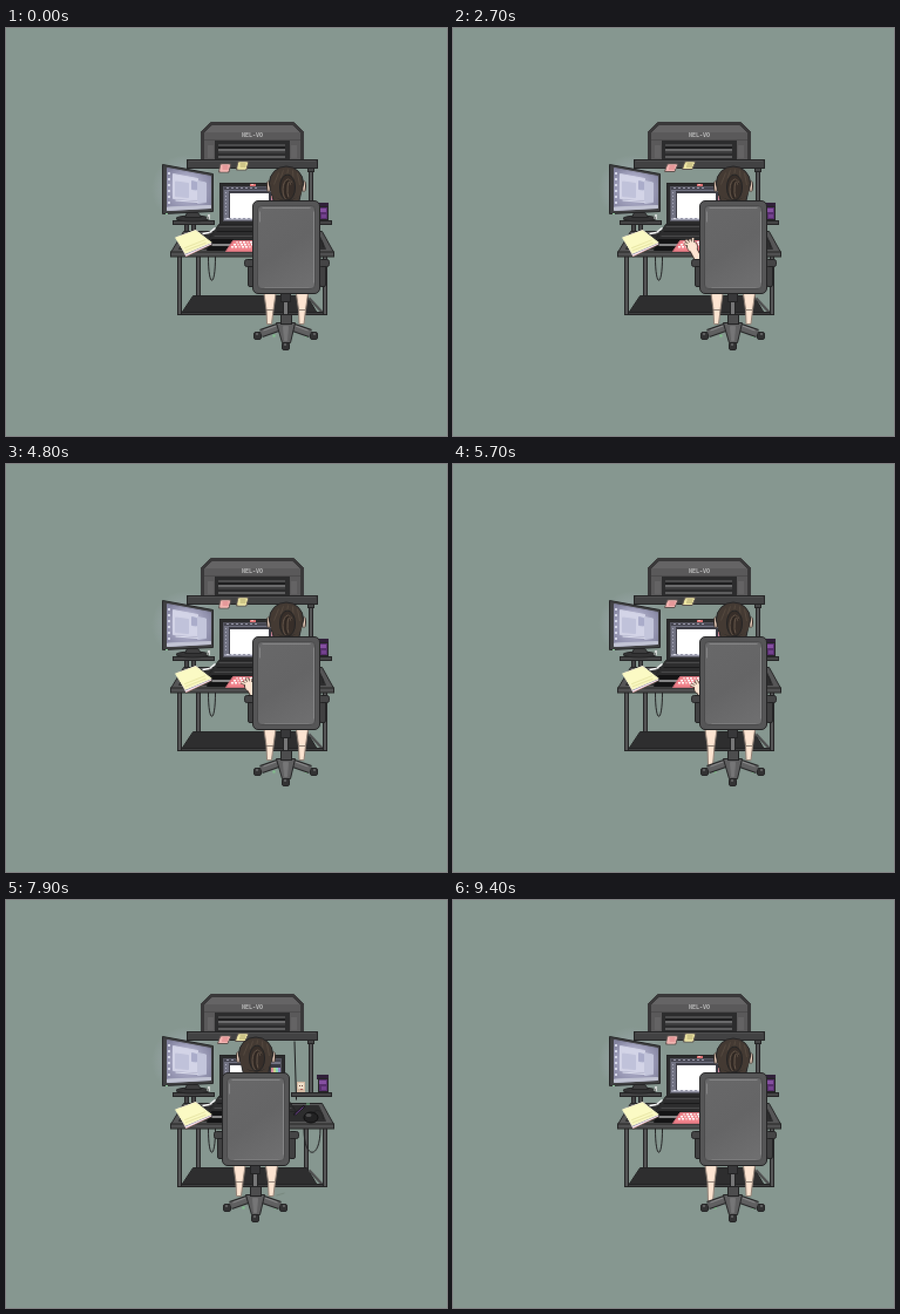
Recreate the animation shown at these times as an HTML page with a canvas. Size 752 by 696 pixels, loop 9500 ms.

```html
<!DOCTYPE html>
<html lang="en">
<head>
<meta charset="utf-8">
<title>At the desk</title>
<style>
html, body { margin: 0; width: 100%; height: 100%; overflow: hidden; background: #869790; }
canvas { display: block; width: 752px; height: 696px; image-rendering: pixelated; }
</style>
</head>
<body>
<canvas id="stage" width="376" height="348"></canvas>
<script>
const c = document.getElementById('stage').getContext('2d');
const INK = '#242425', MID = '#454546', POST = '#555556', SKIN = '#fde4d1';

// Drawing helpers in stage pixels; one canvas cell covers 2 x 2 of them.
function box(fill, x, y, w, h) {
  c.fillStyle = fill;
  c.fillRect(x, y, w, h);
}
// Strokes are shifted by half a cell so that they fill whole cells.
function paint(fill, edge, w = 2) {
  if (fill) { c.fillStyle = fill; c.fill(); }
  if (!edge) return;
  c.strokeStyle = edge;
  c.lineWidth = w;
  c.stroke();
}
function line(color, x0, y0, x1, y1, w = 2) {
  c.beginPath();
  c.moveTo(x0 + 1, y0 + 1);
  c.lineTo(x1 + 1, y1 + 1);
  paint(null, color, w);
}
// Quadrangle with level top and bottom edges
function trap(fill, x0, x1, y0, x2, x3, y1, edge) {
  c.beginPath();
  c.moveTo(x0 + 1, y0 + 1);
  c.lineTo(x1 - 1, y0 + 1);
  c.lineTo(x3 - 1, y1 - 1);
  c.lineTo(x2 + 1, y1 - 1);
  c.closePath();
  paint(fill, edge || fill);
}
// Quadrangle with upright sides, seen at an angle
function pane(fill, x0, x1, top, bottom, slope, rise, edge) {
  c.beginPath();
  c.moveTo(x0 + 1, top + 1);
  c.lineTo(x1 - 1, top + slope + 1);
  c.lineTo(x1 - 1, bottom - rise - 1);
  c.lineTo(x0 + 1, bottom - 1);
  c.closePath();
  paint(fill, edge || fill);
}
function oval(fill, x, y, rx, ry, edge) {
  c.beginPath();
  c.ellipse(x, y, rx, ry, 0, 0, 7);
  paint(fill, edge);
}
function round(fill, x, y, w, h, r, edge) {
  c.beginPath();
  c.roundRect(x + 1, y + 1, w - 2, h - 2, r);
  paint(fill, edge);
}
function bar(x, y, w, h, fill = MID) {
  box(INK, x, y, w, h);
  box(fill, x + 2, y + 2, w - 4, h - 4);
}
function cable(x0, x1, y, depth) {
  c.beginPath();
  c.moveTo(x0 + 1, y);
  c.bezierCurveTo(x0 + 1, y + depth, x1 + 1, y + depth, x1 + 1, y);
  paint(null, INK);
}
function repeat(n, fn) {
  for (let i = 0; i < n; i++) fn(i);
}
// Draws once as is and once reflected about x = mid.
function mirror(mid, fn) {
  fn();
  c.save();
  c.translate(2 * mid, 0);
  c.scale(-1, 1);
  fn();
  c.restore();
}

function printer() {
  trap('#393839', 348, 492, 160, 332, 508, 178);
  box('#393839', 332, 176, 176, 48);
  trap('#656465', 350, 490, 166, 338, 502, 180);
  box('#5a595a', 338, 178, 164, 46);
  box('#4c4b4c', 338, 190, 164, 2);
  box('#2c2c2d', 356, 192, 128, 32);
  mirror(420, () => box('#646364', 344, 200, 10, 22));
  repeat(4, i => box(['#4b4b4c', '#1d1d1e', '#6a6a6b', '#3d3d3e'][i], 362, 198 + i * 4, 114, 4));
  box('#5d5d5e', 362, 218, 114, 4);
  c.fillStyle = '#bdbdbd';
  c.font = 'bold 10px "DejaVu Sans Mono", monospace';
  c.fillText('NEL-VO', 402, 185);
}

function shelves() {
  bar(514, 238, 12, 8);
  bar(516, 244, 8, 86, POST);
  line('#1c1c1d', 491, 240, 494, 340);
  bar(308, 224, 224, 16, '#424243');
  box('#4f4f50', 312, 226, 216, 2);
  repeat(2, i => bar(304 + i * 12, 334, 8, 16));
  bar(486, 328, 70, 8);
  bar(284, 328, 72, 8);
}

function tableFrame() {
  mirror(420, () => bar(324, 388, 8, 74, POST));
  trap('#2e2e2f', 318, 514, 456, 298, 532, 488, INK);
  line('#4d4d4e', 516, 460, 540, 486, 4);
  bar(296, 484, 252, 6, '#3d3d3e');
  mirror(420, () => bar(292, 388, 8, 102, POST));
  line('#79897f', 460, 503, 474, 499);
  cable(344, 356, 390, 54);
  cable(507, 535, 390, 54);
}

function desk() {
  trap('#565657', 302, 540, 346, 280, 560, 384, INK);
  trap('#2d2d2e', 308, 534, 350, 294, 546, 378);
  bar(280, 381, 280, 10, '#505051');
}

function laptop() {
  bar(364, 264, 112, 72, '#2b2b2c');
  box('#55555f', 370, 270, 100, 60);
  box('#727383', 372, 272, 96, 56);
  box('#454550', 372, 272, 96, 4);
  box('#3d3d46', 380, 278, 70, 48);
  box('#fff', 382, 282, 66, 42);
  box('#9798a9', 372, 324, 96, 4);
  repeat(7, i => {
    box('#9a9aac', 376 + i * 8, 272, 4, 2);
    box('#d8d8e4', 376 + i * 8, 324, 4, 2);
    box('#a8a8ba', 374, 280 + i * 6, 2, 2);
  });
  box('#383842', 450, 280, 18, 18);
  repeat(8, i => box(`hsl(${i * 85} 45% 68%)`, 452 + i % 4 * 4, 286 + (i >> 2) * 4, 4, 4));
  box('#dd6d70', 416, 266, 10, 4);
  box('#f2b5b0', 418, 266, 4, 2);
  trap('#2d2d2e', 362, 478, 334, 344, 496, 362, INK);
  repeat(3, i => line(i % 2 ? '#1b1b1c' : '#49494a', 362 - i * 4, 338 + i * 8, 478 + i * 4, 338 + i * 8));
}

function monitor() {
  oval('#343435', 318, 325, 28, 5, INK);
  trap('#3f3f40', 308, 328, 314, 304, 334, 324, INK);
  box('#d4d8d6', 344, 318, 4, 8);
  box('#828784', 342, 322, 4, 4);
  pane('#404042', 266, 354, 232, 318, 16, 4, INK);
  const lit = c.createRadialGradient(306, 270, 8, 312, 278, 48);
  lit.addColorStop(0, '#b9b9d4');
  lit.addColorStop(1, '#83839f');
  pane(lit, 274, 350, 238, 312, 14, 4);
  pane('#d3d4e7', 284, 328, 248, 292, 8, -3);
  pane('#c3c5db', 326, 342, 260, 300, 3, 2);
  pane('#c0c2da', 288, 312, 261, 288, 3, -2);
  pane('#aaaccA', 316, 326, 260, 276, 2, -1);
  line('#dee0ef', 288, 293, 326, 296);
  pane('#c3c5d5', 274, 350, 305, 312, -3, 4);
  repeat(6, i => box('#d5d7e8', 276, 246 + i * 10, 4, 4));
  box('#8ec59a', 272, 316, 4, 2);
}

function papers() {
  c.save();
  c.translate(321, 365);
  c.rotate(-.3);
  const sheets = ['#4c493e', '#f5b7c4', '#fff', '#9e96b8', '#fbfac4'];
  sheets.forEach((fill, i) => {
    c.beginPath();
    c.moveTo(-24 - i, -16);
    c.lineTo(8, -18);
    c.lineTo(25 + i / 2, 13 - i);
    c.lineTo(-20, 20 - i * 1.5);
    c.closePath();
    paint(fill, i ? fill : '#4c493e');
  });
  repeat(2, i => line('#e7e5a5', -20, 4 + i * 5, 18, 1 + i * 5));
  c.restore();
}

function deskItems() {
  trap('#141415', 350, 388, 360, 342, 378, 380);
  line('#fff', 334, 350, 346, 348, 3);
  line('#fff', 346, 348, 356, 340, 3);
  line('#f7f7f7', 350, 369, 382, 369);
  trap('#f0818a', 386, 470, 362, 374, 470, 382, '#d0707a');
  repeat(24, i => {
    const row = i >> 3;
    box(i % 3 ? '#fff' : '#f9c7c7', 392 - row * 4 + i % 8 * 6, 364 + row * 4, 4, 3);
  });

  box('#d2b9a2', 496, 310, 14, 18);
  box('#efe0cb', 498, 312, 10, 10);
  repeat(2, i => box('#67463c', 500 + i * 4, 316, 2, 2));
  box('#a95956', 502, 322, 4, 2);

  box('#302039', 530, 298, 20, 8);
  bar(532, 304, 18, 24, '#572f6d');
  box('#8650a2', 534, 308, 12, 6);
  box('#74428f', 538, 318, 8, 6);

  line('#161617', 490, 366, 508, 350, 4);
  line('#75459a', 492, 365, 506, 352);
  box('#72b887', 512, 347, 6, 2);
  cable(520, 540, 374, -20);
  oval('#222223', 520, 371, 12, 9, '#0e0e0f');
  oval('#4d4d4e', 516, 367, 5, 3);
}

function note(x, y, sway, fill, ink) {
  const h = 16 - sway / 2;
  trap(fill, x + 3, x + 22, y, x - sway, x + 19 - sway, y + h, '#5d5450');
  trap(fill, x + 4, x + 20, y + 2, x + 3 - sway, x + 17 - sway, y + h - 2);
  repeat(2, i => line(ink, x + 6 - i * sway / 2, y + 4 + i * 4, x + 16 - i * sway / 2, y + 4 + i * 4));
}

function limb(fill, x, y, grow) {
  line(fill, x + 8, y + 8, x + 22, y + 34, 11 + grow);
  oval(fill, x + 12, y + 13, 8 + grow / 2, 8 + grow / 2);
}
function hand(x, y, tap) {
  const finger = (fill, w) => repeat(4, i => {
    const a = -2.75 + i * .42, lift = (i + tap) % 2 * 2;
    line(fill, x + 11, y + 11, x + 11 + (16 - lift) * Math.cos(a), y + 11 + (14 - lift) * Math.sin(a), w);
  });
  finger('#332822', 5);
  limb('#332822', x, y, 3);
  finger(SKIN, 3);
  limb(SKIN, x, y, 0);
}

function caster(x, y) {
  round('#333334', x - 7, y - 6, 14, 14, 3, INK);
  box('#5d5d5e', x - 3, y - 4, 4, 4);
}
function shin(x, top, foot) {
  trap(SKIN, x - 10, x + 12, top, x - 6, x + 8, 482, '#8f8075');
  trap(SKIN, x - 6, x + 8, 480, x - 5, x + 5, foot, '#8f8075');
  box('#80c58a', x + 6, 523, 4, 4);
}

function chairBase() {
  bar(468, 452, 18, 16, '#38383a');
  bar(472, 466, 10, 28, '#777778');
  mirror(477, () => {
    caster(429, 524);
    line(INK, 468, 508, 434, 520, 15);
    line('#606061', 468, 508, 434, 520, 11);
    line('#8b8b8c', 438, 515, 460, 507);
  });
  trap('#606061', 460, 494, 502, 470, 486, 538, INK);
  trap('#767677', 472, 482, 508, 474, 480, 534);
  bar(468, 488, 20, 18, '#4d4d4e');
  caster(477, 542);
}

function head() {
  mirror(478, () => oval('#f3d6c2', 508, 270, 3, 9, '#302824'));
  trap('#443a33', 448, 508, 262, 456, 500, 300, INK);
  oval('#443a33', 478, 265, 29, 29, INK);
  oval('#443a33', 478, 276, 27, 18);
  repeat(5, i => line('#55493f', 456 + i * 11, 266 - 14 * Math.sin(i * .8), 464 + i * 8, 246 - 6 * Math.sin(i * .8)));
  oval('#372e29', 480, 272, 13, 22, INK);
  repeat(3, i => {
    c.beginPath();
    c.ellipse(481 + i, 276, 9 - i * 3, 18 - i * 2, 0, 2, 5.6);
    paint(null, i % 2 ? '#2b2420' : '#655649');
  });
}

function chairBack() {
  mirror(479, () => {
    round('#414142', 412, 402, 12, 40, 3, INK);
    round(MID, 406, 394, 20, 14, 4, INK);
  });
  round('#565657', 420, 294, 116, 160, 9, INK);
  const sheen = c.createLinearGradient(430, 306, 526, 446);
  ['#686869', '#656566', '#707071'].forEach((k, i) => sheen.addColorStop(i / 2, k));
  round(sheen, 428, 302, 100, 144, 7, '#4b4b4c');
  line('#858586', 436, 306, 518, 306);
  line('#858586', 432, 312, 432, 330);
  line('#858586', 524, 312, 524, 434);
  line('#7a7a7b', 440, 442, 516, 442);
}

function sitter(dx, stepOut) {
  c.save();
  c.translate(dx, 0);
  shin(stepOut ? 439 : 449, 452, stepOut ? 516 : 506);
  shin(504, 452, 506);
  chairBase();
  c.save();
  c.translate(0, dx < -40 ? -2 : 0);
  head();
  c.restore();
  chairBack();
  c.restore();
}

// Eased progress from a to b, and rounding to whole cells
function ease(n, a, b) {
  const u = Math.min(1, Math.max(0, (n - a) / (b - a)));
  return u * u * (3 - 2 * u);
}
const snap = v => Math.round(v / 2) * 2;

function draw(n) {
  c.setTransform(.5, 0, 0, .5, 0, 0);
  box('#869790', 0, 0, 752, 696);
  const glow = c.createRadialGradient(306, 274, 30, 306, 274, 58);
  glow.addColorStop(0, 'rgba(200,204,228,.22)');
  glow.addColorStop(1, 'rgba(200,204,228,0)');
  box(glow, 240, 210, 132, 130);

  printer();
  shelves();
  tableFrame();
  desk();
  laptop();
  monitor();
  deskItems();
  papers();

  const sway = snap(2 - 2 * Math.cos((Math.floor((n + 2) / 3) % 4) * Math.PI / 2));
  note(362, 231, sway, '#f5b6b3', '#d67d80');
  note(392, 227, sway, '#f1e9a7', '#aaa069');

  // The hand reaches out, moves on to type, then draws back.
  const out = ease(n, 4, 14), far = ease(n, 20, 30), back = ease(n, 41, 52);
  const hx = 394 + snap(30 - 22 * out - 8 * far + 14 * back + 16 * ease(n, 57, 60));
  const hy = 360 + snap(9 - 7 * out - 2 * far + 9 * back);
  if (hx < 420) hand(hx, hy, n >> 1 & 1);

  const dx = -snap(52 * (ease(n, 60, 63) - ease(n, 90, 93)));
  sitter(dx, n > 52 && n < 61 || n > 92);
}

let last = -1;
function tick() {
  const n = Math.floor(performance.now() % 9500 / 100);
  if (n !== last) draw(last = n);
  requestAnimationFrame(tick);
}
tick();
</script>
</body>
</html>
```
